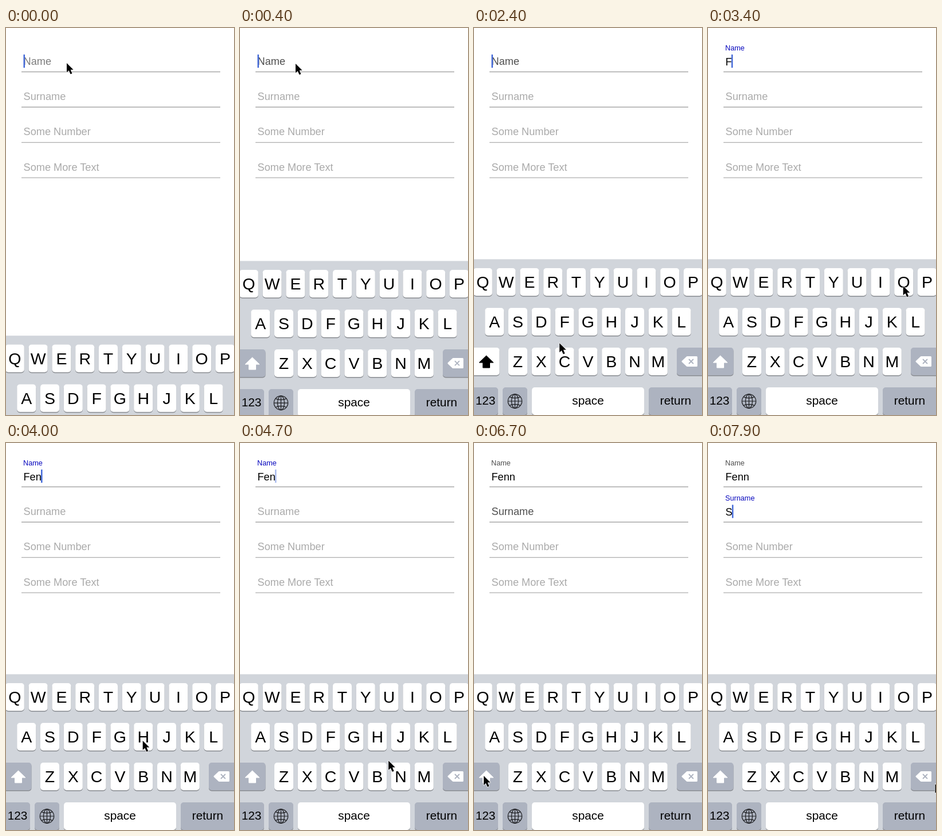
An HTML page that plays this animation: 398x672 px, repeating every 8 s.

```html
<!DOCTYPE html>
<html lang="en">
<head>
<meta charset="utf-8">
<title>Floating label form</title>
<style>
  html, body { margin: 0; width: 100%; height: 100%; overflow: hidden; background: #fff; }
  svg { display: block; width: 398px; height: 672px; }
  text { font-family: "Liberation Sans", Arial, sans-serif; font-size: 18.2px; }
  .label { font-size: 12.7px; }
  .key { font-size: 28.5px; }
  .wide { font-size: 20.8px; }
  .big { font-size: 44px; }
  .key, .wide, .big { text-anchor: middle; }
</style>
</head>
<body>
<svg id="stage" viewBox="0 0 398 672"></svg>
<script>
const LOOP = 8000, LEFT = 30.5;
const FIELD_GAP = 61.3, KEY_GAP = 40.8, ROW_GAP = 69, KEY_TOP = 417, KEY_HEIGHT = 48;
const WHITE = '#fff', GREY = '#adb3c0';
const PALE = [170, 170, 170], DARK = [78, 78, 78], BLUE = [8, 8, 190];

const stage = document.getElementById('stage');

function set(el, attrs) {
  for (const name in attrs) el.setAttribute(name, attrs[name]);
}

function add(parent, tag, attrs, text) {
  const el = document.createElementNS('http://www.w3.org/2000/svg', tag);
  set(el, attrs);
  if (text) el.textContent = text;
  return parent.appendChild(el);
}

const ramp = (t, start, length) => Math.max(0, Math.min(1, (t - start) / length));
const smooth = k => k * k * (3 - 2 * k);
const mix = (a, b, k) => a.map((v, i) => v + (b[i] - v) * k);
const rgb = c => `rgb(${c.map(Math.round).join()})`;

// Form
const values = { Name: 'Fenn', Surname: 'S' };
const fields = ['Name', 'Surname', 'Some Number', 'Some More Text'].map((hint, i) => {
  const y = i * FIELD_GAP;
  add(stage, 'path', { d: `M27 ${76.1 + y}H374`, stroke: '#999', 'stroke-width': 1.1 });
  return {
    hint, y, focus: Infinity, blur: Infinity, typed: [],
    place: add(stage, 'text', { x: LEFT, y: 63.7 + y }, hint),
    label: add(stage, 'text', { x: LEFT - .5, class: 'label' }, hint),
    text: add(stage, 'text', { x: LEFT, y: 64.8 + y })
  };
});
const caret = add(stage, 'rect', { width: 2.5, height: 23, rx: .5, fill: '#446ad9' });

// Keyboard
const board = add(stage, 'g', {});
add(board, 'rect', { y: 401.5, width: 398, height: 275, fill: '#d1d5db' });

function addKey(center, row, width, fill = WHITE) {
  const box = { x: center - width / 2, width, height: KEY_HEIGHT, rx: 5 };
  const y = KEY_TOP + row * ROW_GAP;
  add(board, 'rect', { ...box, y: y + 1.4, fill: '#898c91' });
  return add(board, 'rect', { ...box, y, fill });
}

function addWord(word, x) {
  add(board, 'text', { x, y: 654, class: 'wide' }, word);
}

const keys = {};
['QWERTYUIOP', 'ASDFGHJKL', 'ZXCVBNM'].forEach((letters, row) => {
  [...letters].forEach((letter, i) => {
    const x = 198.9 + (i - (letters.length - 1) / 2) * KEY_GAP;
    const y = KEY_TOP + row * ROW_GAP;
    keys[letter] = [x, y];
    addKey(x, row, 33);
    add(board, 'text', { x, y: y + 34.3, class: 'key' }, letter);
  });
});

const shift = addKey(18, 2, 53, GREY);
const arrow = add(board, 'path', { d: 'M21.5 569l12.5 12h-6.5v9h-12v-9h-6.5z', 'stroke-linejoin': 'round' });

addKey(380, 2, 52, GREY);
add(board, 'path', { d: 'M364 579l8-7.5h16.5v15h-16.5z', fill: WHITE, stroke: WHITE, 'stroke-width': 3, 'stroke-linejoin': 'round' });
add(board, 'path', { d: 'M375 575l8 8m0-8l-8 8', stroke: GREY, 'stroke-width': 1.8 });

addKey(17, 3, 50, GREY);
addKey(71.5, 3, 43, GREY);
addKey(199, 3, 196);
addKey(356, 3, 102, GREY);
addWord('123', 20);
addWord('space', 199);
addWord('return', 352);

const globe = add(board, 'g', { transform: 'translate(71.5 648)', fill: 'none', stroke: '#1b1c1f', 'stroke-width': 1.2 });
add(globe, 'circle', { r: 12.2 });
add(globe, 'ellipse', { rx: 6, ry: 12.2 });
add(globe, 'path', { d: 'M0-12v24M-12 0h24M-9.5-7.4q9.5 4 19 0M-9.5 7.4q9.5-4 19 0' });

// Balloon above a pressed key
const balloon = add(board, 'g', {});
add(balloon, 'path', {
  d: 'M-28-66h56q8 0 8 8v38c0 14-19.5 12-19.5 28v40h-33v-40c0-16-19.5-14-19.5-28v-38q0-8 8-8z',
  fill: WHITE, stroke: '#b4b8be'
});
const balloonText = add(balloon, 'text', { y: -21, class: 'big' });

// The pointer travels to each stop; named stops are tapped at the given time
const TRAVEL = 400, SETTLE = 200, PRESS = 100;
const START = [106, 61];
const stops = [
  [600, [97, 62]], [1700, [242, 520]], [2200, 'Shift'], [2800, 'J'], [3600, 'O'], [4000, 'H'],
  [5100, 'N'], [5900, 'Surname'], [6900, 'Shift'], [7400, 'S'], [8050, [396.5, 592]]
].map(([at, goal]) => ({ at, goal, point: pointOf(goal) }));
const taps = stops.filter(s => typeof s.goal === 'string');

function pointOf(goal) {
  if (goal === 'Shift') return [17, 578];
  if (goal === 'Surname') return [108, 125];
  return keys[goal] ? [keys[goal][0] - 1, keys[goal][1] + 31] : goal;
}

// Turn the taps into focus and typing times
let active = fields[0];
active.focus = -150;
for (const { at, goal } of taps) {
  const next = fields.find(f => f.hint === goal);
  if (next) {
    active.blur = next.focus = at;
    active = next;
  } else if (keys[goal]) {
    active.typed.push(at);
  }
}

const pointer = add(stage, 'path', {
  d: 'M0 0v16l3.7-3.3 2.8 6.4 3-1.2-2.8-6.3h4.9z',
  stroke: WHITE, 'stroke-width': 1.4, 'paint-order': 'stroke', 'stroke-linejoin': 'round'
});

function pointerAt(t) {
  return stops.reduce((pos, { at, point }) =>
    mix(pos, point, smooth(ramp(t, at - SETTLE - TRAVEL, TRAVEL))), START);
}

function caretOpacity(age) {
  const phase = age % 1000;
  return phase < 900 ? 1 - ramp(phase, 620, 150) : ramp(phase, 900, 100);
}

function drawField(f, t) {
  const count = f.typed.filter(time => time <= t).length;
  const lift = count ? ramp(t, f.typed[0], 300) : 0;
  f.text.textContent = (values[f.hint] || '').slice(0, count);
  set(f.place, { opacity: count ? 0 : 1, fill: rgb(mix(PALE, DARK, ramp(t, f.focus, 300))) });
  set(f.label, {
    y: 39 + f.y + 12 * (1 - lift) ** 2,
    opacity: lift,
    fill: rgb(mix(BLUE, DARK, ramp(t, f.blur, 300)))
  });
  if (t < f.focus || t >= f.blur) return;
  set(caret, {
    x: LEFT + (count ? f.text.getComputedTextLength() - .8 : 0),
    y: 46 + f.y,
    opacity: caretOpacity(t - (count ? f.typed[count - 1] : f.focus))
  });
}

function draw(t) {
  fields.forEach(f => drawField(f, t));
  set(board, { transform: `translate(0 ${134 * Math.exp(-t / 106)})` });

  const last = taps.filter(s => s.at <= t).pop();
  const caps = last && last.goal === 'Shift';
  const ink = caps ? '#000' : WHITE;
  set(shift, { fill: caps ? WHITE : GREY });
  set(arrow, { fill: ink, stroke: ink });

  const press = taps.find(s => keys[s.goal] && t >= s.at - PRESS && t < s.at);
  set(balloon, { visibility: press ? 'visible' : 'hidden' });
  if (press) {
    balloonText.textContent = press.goal;
    set(balloon, { transform: `translate(${keys[press.goal]})` });
  }
  set(pointer, { transform: `translate(${pointerAt(t)})` });
}

function tick() {
  draw(performance.now() % LOOP);
  requestAnimationFrame(tick);
}
tick();
</script>
</body>
</html>
```
